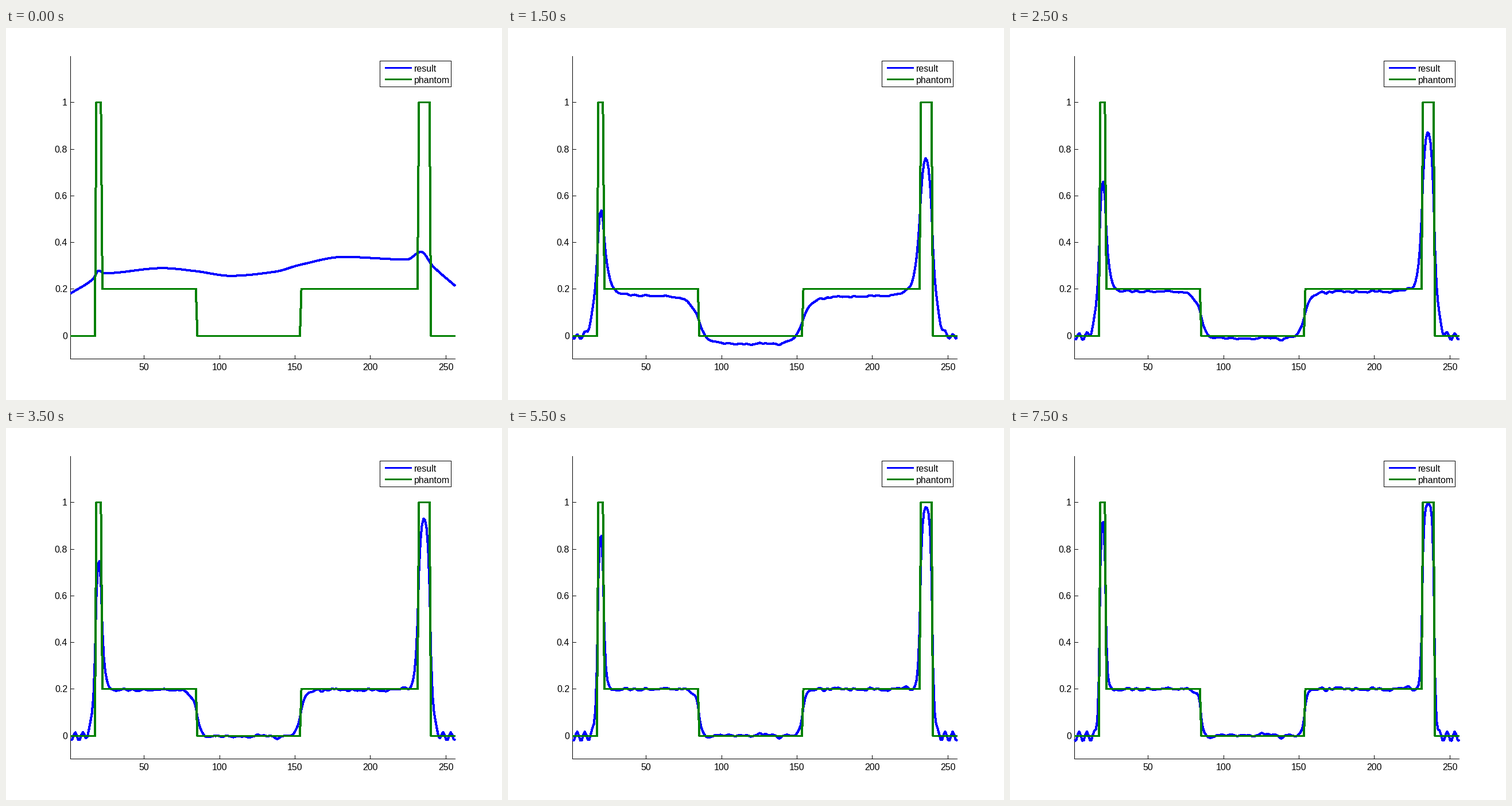
A matplotlib script that plays this animation: 864 by 648 pixels, repeating every 8000 ms.

```python
import numpy as np
import matplotlib.pyplot as plt
from matplotlib.animation import FuncAnimation
from matplotlib.patches import Rectangle

W, H, DPI = 864, 648, 100
FRAMES, INTERVAL = 16, 500
BLUE, GREEN = "#0000ff", "#008000"
PX = 72 / DPI  # points per pixel
LEFT, RIGHT, TOP, BOTTOM = .13 * W, .905 * W, .075 * H, .89 * H

plt.rcParams["font.family"] = "Liberation Sans"
plt.rcParams["path.simplify"] = False

# Steps of the phantom: position, height, relative softness
EDGES = [(17.5, 1, 1), (21.5, -.8, 1), (84.5, -.2, 1.6),
         (153.5, .2, 1.6), (231.5, .8, 1), (239.5, -1, 1)]
# Key points of the first, very blurred estimate
START = [(1, .182), (16, .245), (19.5, .28), (23, .268), (62, .29), (84, .277),
         (107, .257), (137, .275), (153, .304), (182, .338), (224, .327),
         (233.5, .36), (241, .3), (256, .214)]

x = np.arange(1, 257)


def smooth(points, t):
    """Monotone cubic interpolation."""
    kx, ky = np.array(points).T
    h = np.diff(kx)
    d = np.diff(ky) / h
    same = d[:-1] * d[1:] > 0
    inner = np.zeros(len(same))
    inner[same] = 2 / (1 / d[:-1][same] + 1 / d[1:][same])
    m = np.r_[d[0], inner, d[-1]]
    i = np.clip(np.searchsorted(kx, t, side="right") - 1, 0, len(h) - 1)
    u = (t - kx[i]) / h[i]
    v = 1 - u
    return (v * v * ((1 + 2 * u) * ky[i] + u * h[i] * m[i])
            + u * u * ((3 - 2 * u) * ky[i + 1] - v * h[i] * m[i + 1]))


def soft_phantom(width):
    """Phantom with exponentially softened edges."""
    total = np.zeros(len(x))
    for pos, height, soft in EDGES:
        u = (x - pos) / (width * soft)
        total += height * (.5 + .5 * np.sign(u) * (1 - np.exp(-np.abs(u))))
    return total


def make_ripple():
    """Ringing near both ends, fine noise in between."""
    border = np.minimum(x - 1, 256 - x)
    near = 1 / (1 + (border / 16) ** 8)
    ring = .022 * np.cos(2 * np.pi * (border - 2.9) / 5.1) - .003
    kernel = np.hanning(6)
    noise = np.random.default_rng(4).normal(size=len(x))
    noise = np.convolve(noise, kernel / np.linalg.norm(kernel), mode="same")
    return near * ring + (1 - near) * .0045 * noise


phantom = sum(height * (x > pos) for pos, height, _ in EDGES)
first = smooth(START, x)
ripple = make_ripple()
sag = .037 * np.sqrt(np.sin(np.pi * (x - 1) / 255).clip(0))


def estimate(step):
    width = 1 / (.125 + .075 * step)
    return (soft_phantom(width) - sag * .6 ** (step - 3)
            + ripple * (1 - .5 * .8 ** (step - 3)))


def result(n):
    if n == 0:
        return first
    if n == 1:  # overshoots between the blurred start and the later steps
        return .64 * estimate(3) + .36 * first - .14
    return estimate(n + (.5 if n % 2 == 0 else 0))


def to_x(v):
    return LEFT + (v - 1) / 255 * (RIGHT - LEFT)


def to_y(v):
    return BOTTOM - (v + .1) / 1.3 * (BOTTOM - TOP)


def centre(p):
    return np.floor(p) + .5


fig = plt.figure(figsize=(W / DPI, H / DPI), dpi=DPI, facecolor="white")
ax = fig.add_axes([0, 0, 1, 1])
ax.set_xlim(0, W)
ax.set_ylim(H, 0)
ax.axis("off")


def line(xs, ys, color="black", width=1, z=1):
    return ax.plot(xs, ys, color=color, lw=width * PX, zorder=z, antialiased=False,
                   snap=False, solid_capstyle="butt", solid_joinstyle="round")[0]


def label(px, base, text, ha="left"):
    ax.text(px, base, text, ha=ha, va="baseline", fontsize=16 * PX, zorder=6)


line([112.5, 112.5], [49, 577])
line([112, 783], [576.5, 576.5])
for v in range(50, 251, 50):
    px = centre(to_x(v))
    line([px, px], [570, 577])
    label(px - .5, 596.5, str(v), "center")
for v in (0, .2, .4, .6, .8, 1):
    py = centre(to_y(v))
    line([112, 119], [py, py])
    label(107, py + 5.5, f"{v:g}", "right")

curve = line(to_x(x) + .5, to_y(first), BLUE, 3, 3)
line(to_x(x) + .5, centre(to_y(phantom)), GREEN, 3, 4)

ax.add_patch(Rectangle((651.5, 57.5), 124, 45, fc="white", ec="black", lw=PX,
                       antialiased=False, snap=False, zorder=5))
for name, color, py in [("result", BLUE, 69.5), ("phantom", GREEN, 89.5)]:
    line([660, 707], [py, py], color, 3, 6)
    label(710.5, py + 6.5, name)


def update(n):
    curve.set_ydata(to_y(result(n)))
    return [curve]


anim = FuncAnimation(fig, update, frames=FRAMES, interval=INTERVAL,
                     repeat=True, repeat_delay=0, blit=False)
plt.show()
```
